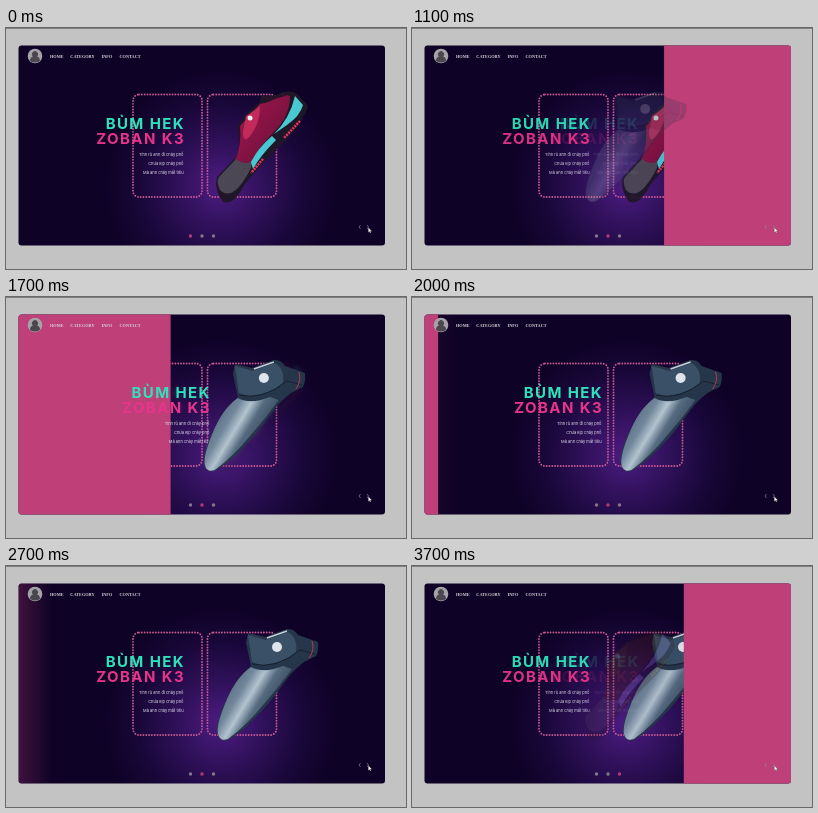
Recreate the animation shown at these times as an HTML page. Size 400 px wide and 241 px high, loop 3.8 s.

```html
<!DOCTYPE html>
<html lang="vi">
<head>
<meta charset="utf-8">
<title>Shoe slider</title>
<style>
  html, body { margin: 0; width: 100%; height: 100%; overflow: hidden; background: #c3c3c3; }
  svg { display: block; width: 100%; height: 100%; }
  .nav { font: 700 4.3px "Liberation Serif", serif; fill: #d4d0da; }
  .title { font: 700 15px Inter, sans-serif; letter-spacing: 1.4px; text-anchor: end; }
  .copy { font: 4px Inter, sans-serif; fill: #e4dfec; text-anchor: end; }
</style>
</head>
<body>
<svg viewBox="0 0 400 241">
  <defs>
    <clipPath id="card"><rect x="12.5" y="17.5" width="366.5" height="200" rx="3"/></clipPath>
    <radialGradient id="glow" gradientUnits="userSpaceOnUse" cx="215" cy="158" r="118">
      <stop stop-color="#4d1c82"/>
      <stop offset=".35" stop-color="#30115b"/>
      <stop offset=".7" stop-color="#190739"/>
      <stop offset="1" stop-color="#0e0226"/>
    </radialGradient>
    <linearGradient id="edge">
      <stop stop-color="#bf3f78" stop-opacity=".28"/>
      <stop offset="1" stop-color="#bf3f78" stop-opacity="0"/>
    </linearGradient>
    <linearGradient id="mesh" x1="0" y1="0" x2="1" y2="1">
      <stop stop-color="#a8184e"/><stop offset="1" stop-color="#620e38"/>
    </linearGradient>
    <linearGradient id="silver" x1="0" y1="0" x2="1" y2=".6">
      <stop stop-color="#3c4d62"/><stop offset=".38" stop-color="#71879b"/>
      <stop offset=".5" stop-color="#b3c3cf"/><stop offset=".62" stop-color="#556b80"/>
      <stop offset="1" stop-color="#1f2b3d"/>
    </linearGradient>

    <g id="text">
      <text class="title" x="179" y="101" fill="#2ee2bb">BÙM HEK</text>
      <text class="title" x="179" y="116" fill="#e6348a">ZOBAN K3</text>
      <g class="copy">
        <text x="177.5" y="128.4">Tính rủ anh đi cháy phố</text>
        <text x="177.5" y="137">Chưa kịp cháy phố</text>
        <text x="177.5" y="145.5">Mà anh cháy mất tiêu</text>
      </g>
    </g>

    <g id="runner">
      <path fill="#1f1728" d="M256 67Q266 70 277 64Q288 62 294 69L301 76Q303 81 297 88Q295 97 277 115L256 136L239 156Q232 169 226 173Q218 177 215 171Q208 160 211 149L231 128Q235 118 232 98L240 86L253 75Z"/>
      <path fill="url(#mesh)" d="M254 76Q266 74 277 66L284 68Q284 88 268 104Q252 120 246 134Q238 138 229 133Q236 116 234 98Z"/>
      <path fill="#c22a5c" d="M240 88Q249 82 254 78Q254 96 244 108Q237 116 237 104Z"/>
      <path fill="#4b4754" d="M230 131Q238 138 247 133Q244 146 232 160Q222 170 214 162Q210 154 213 149Z"/>
      <path fill="#48c8d0" d="M289 68L297 77Q294 88 281 97L268 106Q284 90 289 68ZM266 108L270 112Q254 128 247 141L245 134Q252 120 266 108Z"/>
      <path fill="none" stroke="#2a1228" stroke-width="2.4" d="M256 69Q267 72 281 66"/>
      <path fill="none" stroke="#ee355c" stroke-width="2.4" stroke-dasharray="2 1" d="M294 93L278 110M257 131L245 145"/>
      <circle cx="244" cy="90" r="2.5" fill="#eee"/>
    </g>
    <g id="boot">
      <path fill="#26364a" d="M242 67L259 71L281 63Q288 62 292 69L312 76Q313 84 310 90L298 96Q287 104 277 118Q264 137 249 152Q236 166 222 174Q215 177 212 169Q208 162 218 138L232 113L245 100L240 77Z"/>
      <path fill="url(#silver)" d="M245 101Q258 108 277 100L286 103Q272 122 258 138Q240 160 222 173Q214 176 212 168Q210 160 219 138Q229 112 245 101Z"/>
      <path fill="#3a5067" d="M242 69L260 74L282 66Q292 72 290 86Q276 98 255 99L246 96Z"/>
      <path fill="none" stroke="#c4d0da" stroke-width="1.4" d="M261 72L281 65"/>
      <path fill="none" stroke="#16202f" d="M246 98Q270 104 294 84L309 88"/>
      <path fill="none" stroke="#b53a54" d="M306 75Q309 84 303 92"/>
      <circle cx="271" cy="81" r="5" fill="#dfe3ea"/>
    </g>
    <g id="trainer" style="filter:hue-rotate(75deg)"><use href="#runner"/></g>
  </defs>

  <rect width="400" height="241" fill="#c3c3c3"/>
  <rect width="400" height="1" fill="#808080"/>

  <g clip-path="url(#card)">
    <rect x="12" y="17" width="368" height="201" fill="url(#glow)"/>
    <rect id="residue" x="12" y="17" width="34" height="201" fill="url(#edge)"/>
    <g fill="none" stroke="#c9588f" stroke-width="1.9" stroke-linecap="round" stroke-dasharray="0 2.8">
      <rect x="127" y="66.5" width="69" height="102.5" rx="6"/>
      <rect x="201.5" y="66.5" width="69" height="102.5" rx="6"/>
    </g>
    <g id="leaving"><use href="#text"/><use id="oldShoe"/></g>
    <g id="dots">
      <circle cx="184.5" cy="208" r="1.7"/>
      <circle cx="196" cy="208" r="1.7"/>
      <circle cx="207.5" cy="208" r="1.7"/>
    </g>
    <rect id="wipe" y="17" width="367" height="201" fill="#bf3f78"/>
    <use id="newText" href="#text"/>
    <use id="newShoe"/>

    <circle cx="29" cy="28" r="7.3" fill="#a6a3a8"/>
    <path fill="#4b474f" d="M24 33Q24 29 27 28.5A3 3 0 1 1 31 28.5Q34 29 34 33Q29 36 24 33Z"/>
    <g class="nav">
      <text x="44" y="29.6">HOME</text>
      <text x="64.3" y="29.6">CATEGORY</text>
      <text x="95.5" y="29.6">INFO</text>
      <text x="113.5" y="29.6">CONTACT</text>
    </g>
    <path fill="none" stroke="#8d8796" stroke-width=".7" d="M354.5 197l-1.5 2l1.5 2M361 197l1.5 2l-1.5 2"/>
    <path fill="#fff" stroke="#333" stroke-width=".3" d="M362.3 199.5v5l1.1-1l.8 1.6l.8-.4l-.7-1.5h1.5z"/>
  </g>
</svg>
<script>
const LOOP = 3800, STEP = 100;
const STARTS = [715, 3348];
const shoes = ['#runner', '#boot', '#trainer'];
const $ = id => document.getElementById(id);
const clamp = x => Math.min(1, Math.max(0, x));
const ease = x => (1 - Math.cos(Math.PI * clamp(x))) / 2;

function enter(el, progress, distance, fade) {
  el.setAttribute('transform', `translate(${distance * (1 - progress)} 0)`);
  el.style.opacity = progress > 0 ? clamp(.1 + fade * progress) : 0;
}

function draw(t) {
  const from = t < STARTS[1] ? 0 : 1;
  const s = t - STARTS[from];

  $('oldShoe').setAttribute('href', shoes[from]);
  $('newShoe').setAttribute('href', shoes[from + 1]);

  const out = ease(s / 1200);
  $('leaving').style.opacity = 1 - out * out;
  $('leaving').style.filter = out ? `blur(${2.5 * out}px)` : 'none';

  $('wipe').setAttribute('x', 12 + 367 * (1 - 2 * ease(s / 1410)));
  enter($('newText'), ease((s - 187) / 1630), 50, 2);
  enter($('newShoe'), ease((s - 190) / 1300), -40, 2.5);

  const active = s < 0 ? from : from + 1;
  [...$('dots').children].forEach((dot, i) =>
    dot.setAttribute('fill', i === active ? '#b23a7c' : '#82798c'));

  $('residue').style.opacity = clamp((t - 1900) / 300) * clamp((3150 - t) / 300);
}

function tick() {
  const t = performance.now() % LOOP;
  draw(Math.floor(t / STEP) * STEP);
  requestAnimationFrame(tick);
}
tick();
</script>
</body>
</html>
```
